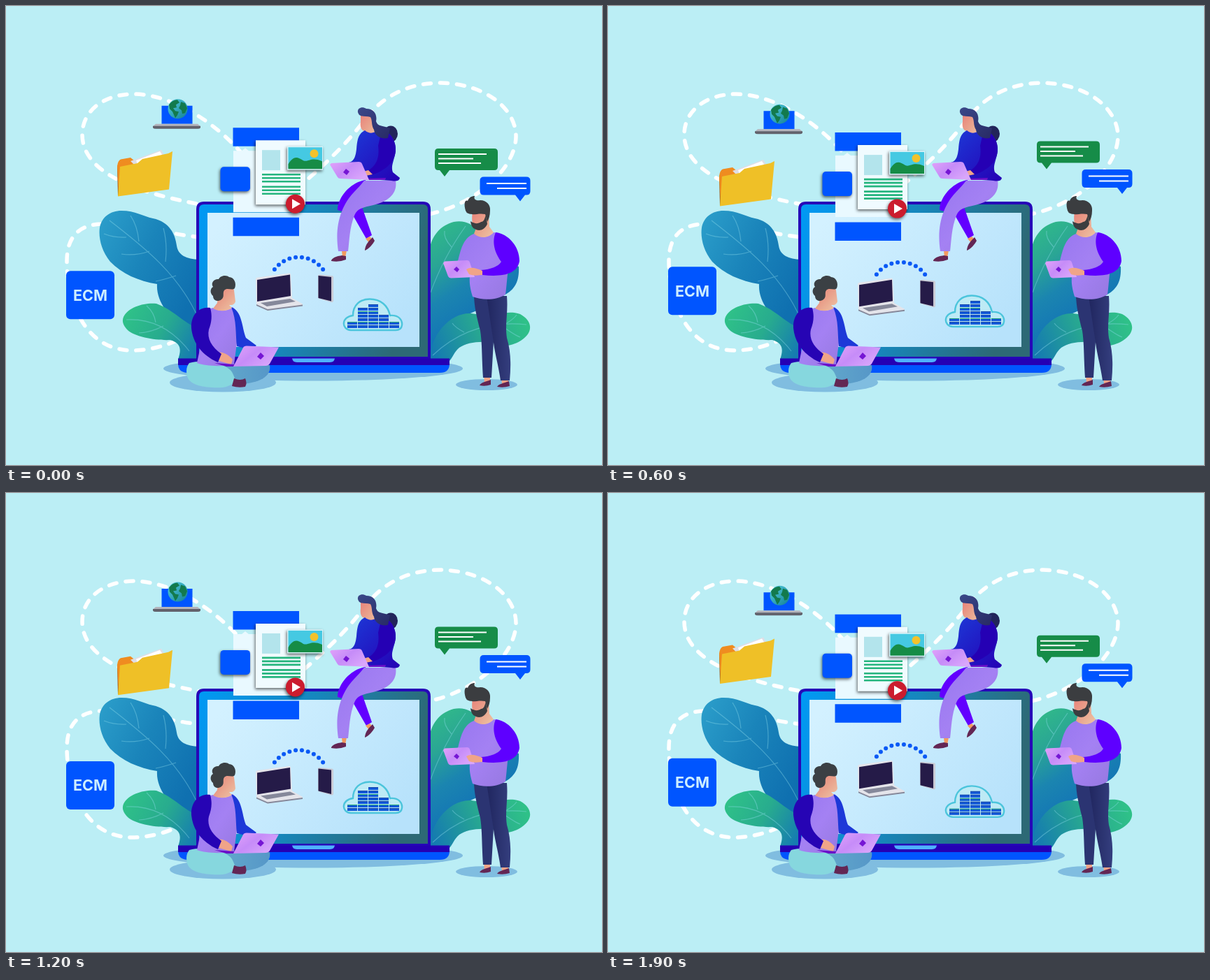
An HTML page that plays this animation: 852x657 px, repeating every 1.92 s.

```html
<!DOCTYPE html>
<html lang="en">
<head>
<meta charset="utf-8">
<style>
  html, body { margin: 0; width: 100%; height: 100%; overflow: hidden; background: #bbeef5; }
  svg { display: block; width: 852px; height: 657px; }
  .lift { filter: drop-shadow(-1px 2px 2px #0009); }
  .dash { fill: none; stroke: #fff; stroke-width: 5.5; stroke-linecap: round; stroke-dasharray: 11 13; }
  .vein { fill: none; stroke: #8fdcec; stroke-opacity: .4; stroke-width: 1.2; }
  .line { fill: none; stroke: #fff; stroke-width: 2; }
  text { font: 700 21.5px Inter, "Open Sans", sans-serif; fill: #cdeeff; }
</style>
</head>
<body>
<svg viewBox="0 0 852 657">
  <defs id="defs"></defs>

  <path class="dash" d="M338 212C300 168 240 127 183 126C140 126 109 150 109 184C109 240 190 268 278 284"/>
  <path class="dash" d="M278 331C230 327 180 308 135 312C100 314 87 335 87 365C87 410 105 492 180 493C205 493 235 486 260 470"/>
  <path class="dash" d="M415 262C470 215 495 187 515 160C545 122 585 110 622 110C690 112 730 150 729 188C727 235 670 285 600 299"/>

  <g fill="#80bde0">
    <ellipse cx="439" cy="519" rx="214" ry="17.500"/>
    <ellipse cx="310" cy="539" rx="76" ry="13.500"/>
    <ellipse cx="687" cy="542" rx="44" ry="8"/>
  </g>

  <!-- leaves -->
  <path fill="url(#leafBlue)" d="M165 293C185 293 196 301 210 304C234 309 242 327 244 343C246 357 258 362 276 363V470C245 458 214 430 216 398C190 394 165 383 149 366C136 350 132 331 134 317C137 302 149 293 165 293Z"/>
  <path class="vein" d="M148 307C190 340 245 380 274 445M228 366Q231 340 225 318M190 337Q188 315 178 300M172 331Q155 332 140 326M205 351Q185 358 165 355M243 386Q225 392 214 394"/>
  <path fill="url(#leafGreenL)" d="M168 445C175 430 200 424 215 426C240 435 255 455 276 462V506H246C251 491 250 483 235 478C215 479 185 474 174 464C166 456 166 450 168 445Z"/>
  <path class="vein" d="M172 449Q225 446 262 494M214 453Q212 439 201 429M225 458Q208 467 190 468"/>
  <path fill="url(#leafR)" d="M605 350C609 327 622 314 640 309C655 306 668 312 673 322C690 345 710 365 733 373C734 395 727 406 712 414C680 444 640 430 606 500Z"/>
  <path class="vein" d="M657 315Q625 360 607 410M637 345Q625 332 627 322M625 370Q650 368 662 352"/>
  <path fill="url(#leafGreenR)" d="M606 507C606 470 636 438 665 440C695 446 716 434 735 441C753 451 753 466 740 476C733 482 726 484 718 486C690 478 662 479 648 489C640 496 640 501 634 508Z"/>
  <path class="vein" d="M744 456Q665 448 610 500M714 455Q726 448 730 442M705 455Q725 470 735 474M655 467Q642 460 638 454"/>

  <!-- big laptop -->
  <path fill="#2606b8" d="M272 505V291Q272 280 283 280H596Q607 280 607 291V505Z"/>
  <path fill="url(#bezel)" d="M276 502V291Q276 284 283 284H596Q603 284 603 291V502Z"/>
  <path fill="url(#screen)" d="M288 296H591V488H288Z"/>
  <path fill="#0055ff" d="M246 512H634Q634 525 620 525H260Q246 525 246 512Z"/>
  <path fill="#2500b4" d="M246 504.500H634V514H246Z"/>
  <path fill="#4fb2ff" d="M409 504.500H470Q469 510 463 510H416Q410 510 409 504.500Z"/>

  <!-- linked devices -->
  <g id="devices">
    <g id="dots" fill="#0a59f5"></g>
    <path fill="#e4e4ea" d="M357 391Q357 389 360 388.500L404 382.500Q407 382 407 384L409 418 424 426.500V429L374 436 358 427Z"/>
    <path fill="#251b48" d="M359 392 406 384.500 407 415 359 423Z"/>
    <path fill="#85889a" d="M364 425 406 419 414 423 373 430ZM358 427 374 434 424 427.500V429.500L374 436 358 429Z"/>
    <path fill="#c9cad4" d="M446 386Q446 384.500 448 384.500L465 386Q468 386 468 388V422Q468 424 465 424L448 419Q446 418 446 417Z"/>
    <path fill="#251b48" d="M446.500 386 465 388V422.500L446.500 418Z"/>
  </g>

  <g id="cloud">
    <path fill="#bdeaf5" stroke="#4cc5dc" stroke-width="2.400" d="M493 464C479 463 479 445 496 443C496 428 506 419.500 520 419.500C536 419.500 546 429 549 443C562 442 567 450 566 457Q565 464 557 464Z"/>
    <g id="bars"></g>
  </g>

  <!-- documents -->
  <g id="docs">
    <path fill="#e9f9ff" d="M325 207H337L342 203 347 207H419V295H325Z"/>
    <path fill="#0055ff" d="M324.500 174H419V200.500H324.500ZM324.500 302.500H419V329H324.500Z"/>
    <path class="lift" fill="#f0fbff" d="M357 192H428V284H357Z"/>
    <path fill="#b3e4ec" d="M366 206H392V235H366Z"/>
    <path fill="none" stroke="#25b57e" stroke-width="2.600" d="M366 241H421M366 246H421M366 251H421M366 258.500H421M366 263.500H421M366 268.500H421"/>
    <rect class="lift" x="306.500" y="230" width="42.500" height="35" rx="5" fill="#0055ff"/>
    <g class="lift">
      <path fill="#d6f4fa" d="M402 200.500H453V234.500H402Z"/>
      <path fill="#45c9e2" d="M403.500 202H452V232H403.500Z"/>
      <circle cx="440.500" cy="211" r="6" fill="#f3c22b"/>
      <path fill="#168c46" d="M403.500 226C411 214 416 215 425 221C432 224 436 215 452 222V233H403.500Z"/>
    </g>
    <circle class="lift" cx="413.500" cy="283" r="13.500" fill="#cb1c2e"/>
    <path fill="#fff" d="M409 276V290L421 283Z"/>
  </g>

  <g id="globe">
    <path fill="#0055ff" d="M222.500 142.500H266.500V168.500H222.500Z"/>
    <path fill="#b4b4bc" d="M214 168.500H274L278 172H210Z"/>
    <path fill="#62626c" d="M210 171.500H278V174Q277 175.500 274 175.500H214Q211 175.500 210 174Z"/>
    <circle cx="245.500" cy="147" r="14" fill="url(#sea)"/>
    <path fill="#137a4d" d="M233 141Q238 134 245 134L248 138 243 141 244 145 239 146 242 150 247 151 245 156 242 160 238 151 234 147ZM250 137 256 139 259 146 256 153 252 154 251 149 247 146 249 142Z"/>
  </g>

  <g id="folder">
    <path fill="#8a5415" d="M159 229 162 226 164 270 160 272Z"/>
    <path fill="#ef8c20" d="M159 229Q160 221 164 219.500L178 217 183 221 226 213 224 255 161 270Z"/>
    <path fill="#dedee6" d="M178 222 222 206 230 220 190 234Z"/>
    <path fill="#fff" d="M186 221 220 208 228 221 190 232Z"/>
    <path fill="#efc027" d="M163 230 188 225 195 219 232 211 238 208 233 262.500 160 272.500Z"/>
  </g>

  <g id="ecm">
    <rect x="86" y="379.500" width="69" height="69" rx="6" fill="#0055ff"/>
    <text x="120.500" y="422" text-anchor="middle">ECM</text>
  </g>

  <g id="chat">
    <path fill="#168c48" d="M618 204H698Q703 204 703 209V230Q703 235 698 235H634L627 244 620 235H618Q613 235 613 230V209Q613 204 618 204Z"/>
    <path class="line" d="M618 212H687M618 218.500H668M618 225H679"/>
    <path fill="#0055ff" d="M683 244.500H744Q749.500 244.500 749.500 250V265Q749.500 270.500 744 270.500H742L735 279.500 728 270.500H683Q677.500 270.500 677.500 265V250Q677.500 244.500 683 244.500Z"/>
    <path class="line" d="M687 254H744M702 261H744"/>
  </g>

  <!-- woman -->
  <ellipse cx="550" cy="183" rx="10" ry="11.500" fill="#22245a"/>
  <path fill="url(#skin)" d="M507 156C509 151 519 151 523 157L525 174 531 182 518 187 514 179C507 179 506 172 507 165Z"/>
  <path fill="#6200ff" d="M514 249C490 253 474 276 474 292L495 298 515 333 523 328 508 285Z"/>
  <path fill="#f39a60" d="M514 333 520 330 525 335 519 339ZM480 350H487L485 360H481Z"/>
  <path fill="#632654" d="M513 349C514 341 519 336 524 331L527 336C524 341 520 347 513 350ZM465 364C468 359 475 358 480 357L486 358 486 363Q476 367 465 365Z"/>
  <path fill="url(#lilac)" d="M512 250H557C560 268 547 280 525 285C508 289 502 290 498 300C491 318 491 335 489 351H475C472 330 473 312 480 294C490 270 500 266 512 250Z"/>
  <path fill="url(#top)" d="M513 178C520 184 527 182 531 177C547 176 556 190 557 203C557 219 549 228 553 238L563 246Q562 252 551 250L518 248 490 224C499 222 500 212 501 205C502 193 503 183 513 178Z"/>
  <path fill="#2500b4" d="M537 178C551 180 558 195 557 208C555 226 540 236 523 242L517 236C531 228 534 215 532 200Z"/>
  <path fill="url(#hair)" d="M503 152C502 146 509 143 515 147C526 147 531 155 529 165C531 173 540 171 549 175L546 189C536 191 527 186 526 177C522 171 524 164 521 159C514 157 505 160 503 152Z"/>
  <path fill="#f0a488" d="M524 241 518 235 511 237 514 243Z"/>
  <path fill="#6a10c8" d="M512 247 543 246 542 249H515Z"/>
  <path fill="url(#pink)" d="M465 225 504 223Q508 223 509 226L519 249 478 247Q475 247 474 245L463 227Z"/>
  <path fill="#7616d4" d="M486 233 491 237 487 242 482 238Z"/>

  <!-- standing man -->
  <path fill="#f0a488" d="M683 528H692V540H684ZM708 530H718V541H709Z"/>
  <path fill="#632654" d="M677 543C680 538 686 538 693 535V542Q685 545 677 543ZM702 545C704 541 711 540 719 537L720 544Q711 547 702 545Z"/>
  <path fill="#2b3472" d="M669 412H700C700 440 696 460 697 480L694 532H682C680 505 681 485 678 465C673 445 669 430 669 412Z"/>
  <path fill="url(#navy)" d="M687 415H716C718 440 713 455 716 475C722 495 722 515 720 536H707C704 515 699 498 697 482Z"/>
  <path fill="url(#lilac)" d="M669 326C680 333 690 331 697 324C715 326 722 345 720 365C716 385 716 400 714 413C700 422 680 421 667 416C662 400 662 390 664 380L646 365C650 350 653 332 669 326Z"/>
  <path fill="#5e00ff" d="M700 324C718 326 734 344 734 365C731 384 710 388 681 385L679 378C693 377 704 373 708 366C699 354 694 338 700 324Z"/>
  <path fill="url(#skin)" d="M667 295C675 286 688 288 690 298L691 316 697 324C690 333 677 333 669 326L672 318C667 318 665 306 667 295Z"/>
  <path fill="#3b3d40" d="M664 308C670 312 675 312 679 309C684 309 684 303 686 300L688 312C684 321 676 323 670 319Q665 317 664 308Z"/>
  <path fill="#3b3d40" d="M657 293C654 283 656 277 660 279C662 273 667 272 670 272C668 277 672 279 678 278C687 278 693 285 692 293C692 300 690 305 688 309L685 298C676 296 668 300 661 297Q658 296 657 293Z"/>
  <path fill="url(#pink)" d="M627 365.500 659 364Q662 364 663 367L670 388 636 389.500Q633 389 632 387L625 368Z"/>
  <path fill="#7616d4" d="M644 373 648 377 645 381 640 377Z"/>
  <path fill="#f0a488" d="M681 379C672 375 664 373 658 377L662 384C670 387 677 385 681 385Z"/>

  <!-- seated man -->
  <path fill="url(#jeans)" d="M310 512L377 514C380 530 362 540 335 541L300 540Z"/>
  <path fill="#86d7de" d="M262 511C285 505 320 512 325 528C330 537 325 543 310 546C290 547 263 545 259 530Q256 518 262 511Z"/>
  <path fill="#632654" d="M326 533Q335 537 342 533Q345 540 342 545Q332 547 323 544Z"/>
  <path fill="url(#lilac)" d="M296 432C305 438 316 437 324 431C336 440 334 460 331 475L326 513C305 517 285 515 273 511C276 495 280 485 277 465C277 448 280 436 296 432Z"/>
  <path fill="#1d38d8" d="M322 431C338 437 337 460 343 475L358 486 350 492 330 487C328 470 330 450 322 431Z"/>
  <path fill="#f0a488" d="M299 498C308 492 318 499 324 506L322 513 304 508Z"/>
  <path fill="#2604b4" d="M292 432C276 430 264 442 265 461C267 482 280 500 303 510L308 498C294 488 287 476 290 463C294 453 295 443 292 432Z"/>
  <path fill="url(#skin)" d="M303 408C312 400 326 402 326 407L328 423C326 429 321 428 319 428L323 432C315 438 303 437 296 433L302 425Z"/>
  <path fill="#3b4044" d="M327 404C323 408 316 402 312 407C309 411 313 416 308 420C303 424 296 422 296 415C291 411 292 404 296 402C292 396 298 390 304 391C307 385 316 385 319 388C326 388 330 397 327 404Z"/>
  <path fill="#6a10c8" d="M298 511 327 513 326 516H315Z"/>
  <path fill="url(#pink)" d="M325 516 339 489Q340 486.500 344 486.500L390 488.500 377 512Q375 515 371 515Z"/>
  <path fill="#7616d4" d="M364 496 369 501 364 506 359 502Z"/>
</svg>
<script>
const LOOP = 1920, DASH = 24;
const $ = id => document.getElementById(id);

// name: x1, y1, x2, y2, then evenly spaced colours
const gradients = {
  leafBlue: [0, 0, 1, .6, '#2c9fcb', '#1a84ba', '#0f70b0'],
  leafGreenL: [0, .3, 1, .7, '#2fc188', '#28ac8e', '#167db0'],
  leafR: [.2, 0, .5, .7, '#30b88a', '#2aa595', '#1b85b0', '#1477b5'],
  leafGreenR: [1, .4, 0, .6, '#2fc188', '#27a692', '#157cb0'],
  bezel: [0, 0, 1, .2, '#0099f5', '#1687bd', '#2d6975'],
  screen: [0, .2, 1, .7, '#d3f1ff', '#b7e2fb'],
  sea: [0, 0, 1, 1, '#55cfdf', '#117f96'],
  skin: [0, 0, 1, 1, '#e97f78', '#e9a18b', '#eec5a5'],
  hair: [0, 0, 1, 1, '#3a4889', '#282a65'],
  lilac: [0, 0, 1, 1, '#9877f0', '#a481f3', '#9678e0'],
  top: [0, 0, 1, 1, '#1c3bd8', '#2500b4'],
  pink: [0, 0, 1, .6, '#e2a3fa', '#c68cf8', '#d9a6fb'],
  navy: [0, 0, 1, 0, '#20265f', '#343e7e'],
  jeans: [0, 0, 1, 0, '#63aacb', '#5697c8']
};
$('defs').innerHTML = Object.entries(gradients).map(([id, [x1, y1, x2, y2, ...stops]]) =>
  `<linearGradient id="${id}" x1="${x1}" y1="${y1}" x2="${x2}" y2="${y2}">` +
  stops.map((c, i) => `<stop offset="${i / (stops.length - 1)}" stop-color="${c}"/>`).join('') +
  '</linearGradient>').join('');

$('dots').innerHTML = Array.from({ length: 10 }, (_, i) => {
  const a = (i / 9 - .5) * 1.87;
  return `<circle cx="${418.5 + 43 * Math.sin(a)}" cy="${402.5 - 43 * Math.cos(a)}" r="3"/>`;
}).join('');

$('bars').innerHTML = [2, 6, 7, 4, 2].map((rows, col) =>
  Array.from({ length: rows }, (_, r) => {
    const x = 488 + col * 15, y = 457 - r * 5;
    return `<rect x="${x}" y="${y}" width="14" height="4" fill="#1258d8"/>` +
      `<rect x="${x}" y="${y}" width="14" height="1" fill="${r % 3 == 1 ? '#28a878' : '#1746a8'}"/>`;
  }).join('')).join('');

// 0 at the start of a cycle, 1 halfway, straight in between
const tri = x => 1 - Math.abs(2 * (x % 1) - 1);
const drift = { folder: 22.4, chat: -16.7, devices: 11.5, cloud: -8 };
const sway = { globe: 21, docs: 19.5, ecm: -17 };
const shift = (id, y) => $(id).setAttribute('transform', `translate(0 ${y})`);
const dashes = document.querySelectorAll('.dash');

function draw(now) {
  const p = now % LOOP / LOOP;
  for (const id in drift) shift(id, drift[id] * tri(p));
  for (const id in sway) shift(id, sway[id] * (tri(p + .255) - .5));
  for (const d of dashes) d.style.strokeDashoffset = -DASH * p;
  requestAnimationFrame(draw);
}
draw(0);
</script>
</body>
</html>
```
